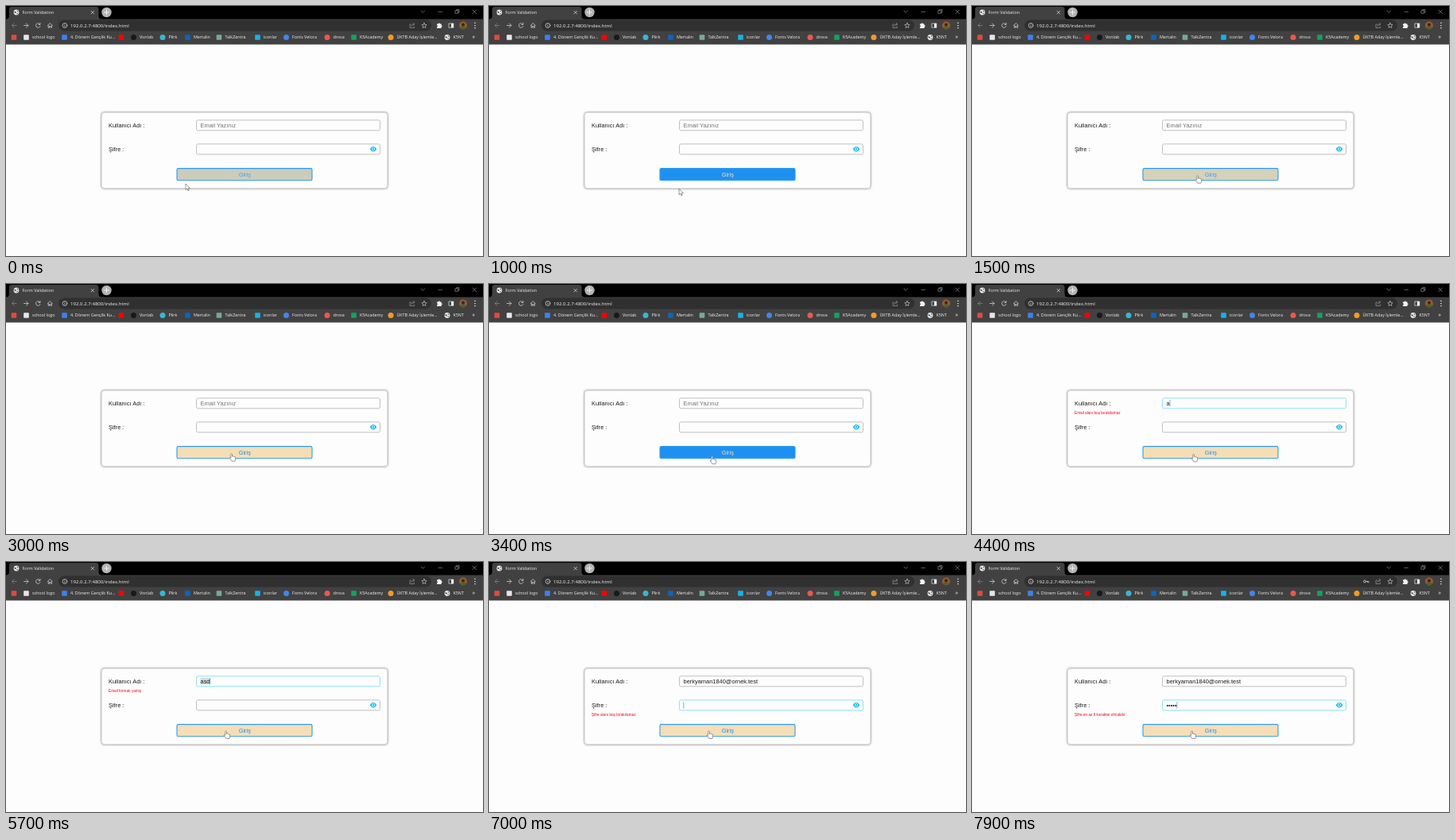
These frames come from a looping animation (600 by 315 pixels, 8000 ms). An HTML page:

```html
<!DOCTYPE html>
<html lang="tr">
<head>
<meta charset="utf-8">
<title>Form Validation</title>
<style>
  html, body { margin: 0; width: 100%; height: 100%; overflow: hidden; background: #fdfdfd; }
  svg { display: block; width: 600px; height: 315px; }
  text { white-space: pre; }
  .ui { font: 5.4px "Open Sans", "Noto Sans", sans-serif; fill: #f1f1f1; }
  .url { font-size: 6.1px; }
  .form { font: 7.45px "Liberation Sans", Arial, sans-serif; fill: #1c1c1c; }
  .error { font-size: 4.7px; fill: #f00018; }
  .line { fill: none; stroke: #d4d4d4; stroke-width: .75; stroke-linecap: round; stroke-linejoin: round; }
  .window { stroke: #a8a8a8; stroke-width: .6; }
  .field { fill: #fdfdfd; stroke-width: .8; }
  .cursor { fill: #fff; stroke: #555; stroke-width: .6; stroke-linejoin: round; }
  #hint { fill: #757575; }
</style>
</head>
<body>
<svg viewBox="0 0 600 315">
  <defs>
    <filter id="blur" x="-5%" y="-15%" width="110%" height="130%"><feGaussianBlur stdDeviation="1.5"/></filter>
    <g id="globe">
      <circle r="3.4" fill="#e8eaed"/>
      <path d="M-2.8-1.4 0-.6-.6 1-2 .8ZM.6-2.8 2.6-1.6 1.4-.4ZM.4 1.2 2.4.6 1 2.8Z" fill="#4a4c50"/>
    </g>
  </defs>

  <rect width="600" height="315" fill="#fdfdfd"/>
  <rect width="600" height="17" fill="#000"/>
  <path d="M0 16.500Q4 16.500 4 12V4Q4 1 7 1H113Q116.500 1 116.500 4V12Q116.500 16.500 120 16.500H600V48.500H0Z" fill="#414141"/>
  <rect x="66" y="17.500" width="469" height="14" rx="7" fill="#303030"/>

  <g class="ui">
    <use href="#globe" x="13" y="8"/>
    <text x="20.500" y="10">Form Validation</text>
    <text class="url" x="81" y="26.500">192.0.2.7:4800/index.html</text>
    <g id="bookmarks"></g>
    <text x="586.500" y="41" font-size="7">»</text>
  </g>

  <circle cx="126.500" cy="8" r="6.200" fill="#b4b4b4"/>
  <g class="line">
    <path d="M107 6.300l3.600 3.600m0-3.600-3.600 3.600"/>
    <path d="M123.500 8h6m-3-3v6" stroke="#fff"/>
    <g class="window">
      <path d="M522 6l2.300 2.200L526.600 6M544 7.300h4.500M587 5l4.500 4.500m0-4.500L587 9.500"/>
      <path d="M565.300 5.800h3.400v3.400h-3.400zM566.600 5.600V4.600h3.400V8h-1"/>
    </g>
    <path d="M13 24.500H7.500m2.600-2.600-2.600 2.600 2.600 2.600" stroke="#85878b"/>
    <path d="M22.500 24.500H28m-2.600-2.600 2.600 2.600-2.600 2.600"/>
    <path d="M42.600 22.800A2.800 2.800 0 1 0 43 25.500M43 21.500v2h-2"/>
    <path d="M52.300 24.500 55.300 21.700 58.300 24.500M53.200 24.500v2.800h1.300v-1.800h1.600v1.800h1.300v-2.800"/>
    <circle cx="74" cy="24.500" r="2.900"/>
    <path d="M74 24.300v1.600m0-3.100v.1"/>
    <path d="M509.500 23h-1.500v4.500h5.500V26M509.800 25.500q.3-2.500 3.700-2.700m-1.300-1.500 1.600 1.500-1.600 1.500" stroke="#aaa" stroke-width=".6"/>
    <path d="M526 21.300l.9 2.200 2.300.2-1.800 1.500.6 2.300-2-1.200-2 1.200.6-2.300-1.800-1.500 2.300-.2Z" stroke-width=".6"/>
    <path d="M557.300 22h5.500v5.200h-5.500z"/>
  </g>
  <path d="M542 22.500h1.700a1.100 1.100 0 0 1 2.200 0h1.700v1.700a1.100 1.100 0 0 1 0 2.200v1.500H542v-1.700a1 1 0 0 0 0-2Z" fill="#f1f3f4"/>
  <path d="M560 22h3v5.200h-3zM589.300 20.800h1.300v1.300h-1.300zM589.300 23.900h1.300v1.300h-1.300zM589.300 27h1.300v1.300h-1.300z" fill="#f1f3f4"/>
  <g id="key" class="line">
    <circle cx="494" cy="24.500" r="1.500"/>
    <path d="M495.500 24.500h3.500v1.400m-1.500-1.400v1"/>
  </g>
  <circle cx="575" cy="24.500" r="5" fill="#9a5a2b"/>
  <path d="M571 27.300q4-4 8 0-1.500 2.200-4 2.200t-4-2.200Z" fill="#49642f"/>
  <circle cx="575" cy="23.400" r="2" fill="#3b2418"/>

  <rect x="120" y="134" width="360" height="96" rx="4" fill="#777" filter="url(#blur)"/>
  <rect x="120.200" y="134.200" width="359.600" height="95.600" rx="4" fill="#fdfdfd" stroke="#c8c8c8" stroke-width=".5"/>

  <g class="form">
    <text x="129" y="153">Kullanıcı Adı :</text>
    <text x="129" y="183">Şifre :</text>
    <text id="emailError" class="error" x="129" y="163.500"></text>
    <text id="passError" class="error" x="129" y="193.500"></text>
    <rect id="emailBox" class="field" x="239.500" y="143.800" width="231" height="13" rx="2"/>
    <rect id="passBox" class="field" x="239.500" y="173.900" width="231" height="13" rx="2"/>
    <rect id="selection" x="244.500" y="146" width="12.500" height="8.600" fill="#d5dde3"/>
    <text id="hint" x="244.500" y="153">Email Yazınız</text>
    <text id="email" x="244.500" y="153"></text>
    <text id="pass" x="244.500" y="183"></text>
    <rect id="caret" width=".7" height="8.400" fill="#1f9fc4"/>
    <path d="M457.700 180.200Q459.500 177 462 177t4.300 3.200q-1.800 3.200-4.300 3.200t-4.300-3.200Z" fill="#10bdf0"/>
    <circle cx="462" cy="180.200" r="2" fill="#fff"/>
    <circle cx="462" cy="180.200" r="1.200" fill="#10bdf0"/>
    <rect id="button" x="215" y="204.600" width="170" height="15.200" rx="1.800" stroke="#2c9bf2" stroke-width="1.100"/>
    <text id="buttonText" x="300.300" y="215" text-anchor="middle">Giriş</text>
  </g>

  <path id="arrow" class="cursor" d="M0 0V7.600L1.800 6 3 8.800 4.200 8.300 3 5.600H5.300Z"/>
  <path id="hand" class="cursor" d="M-.2.800Q.8-.6 1.500.8V3.700Q2.500 3 3 4q1-.5 1.400.3 1.200-.3 1.300.8V7.200Q5.500 8.200 4.900 9.700H.8Q.1 8-1.900 5.900-1.800 4.500-.2 5.600Z"/>
</svg>

<script>
const LOOP = 8000, STEP = 100;
const ADDRESS = 'berkyaman1840@ornek.test';
const ui = Object.fromEntries([...document.querySelectorAll('[id]')].map(el => [el.id, el]));

// Icon x, icon shape, icon colour, label
const bookmarks = [
  [10, 'square', '#e04a3f', ''],
  [25.5, 'square', '#e6e6ea', 'school logo'],
  [73.5, 'square', '#3b82f0', '4. Dönem Gençlik Ku...'],
  [145, 'square', '#f00', ''],
  [160.5, 'circle', '#17191c', 'Vonlab'],
  [197, 'circle', '#37b6d8', 'Plirk'],
  [228.5, 'square', '#0a66c2', 'Mertalin'],
  [268, 'square', '#74aa9c', 'TalkZentra'],
  [316.5, 'square', '#12b5e8', 'iconlar'],
  [352.5, 'circle', '#3f86f0', 'Fonts Velora'],
  [404, 'circle', '#f0564a', 'drova'],
  [437.5, 'square', '#14a35c', 'K5Academy'],
  [484, 'circle', '#f39a26', 'ÜKTB Aday İşlemle...'],
  [555, 'globe', '', 'K5NT'],
];
const icons = {
  square: (x, fill) => `<rect x="${x - 3.3}" y="36.200" width="6.600" height="6.600" rx=".8" fill="${fill}"/>`,
  circle: (x, fill) => `<circle cx="${x}" cy="39.500" r="3.500" fill="${fill}"/>`,
  globe: x => `<use href="#globe" x="${x}" y="39.500"/>`,
};
ui.bookmarks.innerHTML = bookmarks.map(([x, shape, fill, label]) =>
  icons[shape](x, fill) + `<text x="${x + 7.4}" y="41.400">${label}</text>`).join('');

// Timelines of [start, value]
const cursorPath = [
  [0, [226, 224]], [200, [232, 228]], [900, [232, 228]], [1100, [246, 232.5]],
  [1200, [246, 232.5]], [1500, [283, 213.5]], [3000, [283, 213.5]], [3400, [280, 217]],
  [3700, [280, 215.5]], [4200, [280, 215.5]], [4600, [276, 212.8]],
];
const hover = [
  [0, [.8]], [200, [0]], [1300, [0]], [1500, [.85]], [1800, [.85]], [2000, [1]],
  [3000, [1]], [3400, [0]], [3500, [0]], [3700, [.3]], [3900, [.85]], [4100, [1]],
];
const buttonFill = [
  [0, [30, 144, 240]], [.3, [92, 160, 203]], [.8, [203, 204, 188]], [1, [245, 222, 181]],
];
const buttonInk = [[0, [245, 222, 179]], [1, [30, 144, 255]]];
const emailTyped = [
  [0, ''], [4400, 'a'], [4500, 'as'], [4600, 'asd'],
  ...[[6000, 1], [6100, 2], [6200, 3], [6400, 4], [6500, 24]].map(([at, n]) => [at, ADDRESS.slice(0, n)]),
];
const passTyped = [[0, ''], ...[1, 2, 3, 4, 5].map(n => [7300 + n * 100, '•'.repeat(n)])];
const emailErrors = [[0, ''], [3600, 'Email alanı boş bırakılamaz'], [4900, 'Email formatı yanlış'], [6700, '']];
const passErrors = [[0, ''], [6700, 'Şifre alanı boş bırakılamaz'], [7900, 'Şifre en az 6 karakter olmalıdır']];
const focus = [[0, ''], [3600, 'email'], [6700, 'pass']];
const caretStarts = [3800, 6700, ...emailTyped.slice(1).map(k => k[0]), ...passTyped.slice(1).map(k => k[0])];

const hold = (keys, t) => keys.findLast(([at]) => at <= t)[1];

function blend(keys, t) {
  const next = keys.findIndex(([at]) => at > t);
  if (next < 0) return keys.at(-1)[1];
  const [[t0, a], [t1, b]] = [keys[next - 1], keys[next]];
  return a.map((v, i) => v + (b[i] - v) * (t - t0) / (t1 - t0));
}

const rgb = color => `rgb(${color.map(Math.round)})`;
const show = (el, on) => el.setAttribute('visibility', on ? 'visible' : 'hidden');

function setText(el, value) {
  if (el.textContent !== value) el.textContent = value;
}

function drawCaret(t, active) {
  const start = Math.max(...caretStarts.filter(at => at <= t));
  const on = active && t >= 3800 && (t - start) % 1000 < 500;
  show(ui.caret, on);
  if (!on) return;
  const field = ui[active];
  const width = field.textContent ? field.getComputedTextLength() : 0;
  ui.caret.setAttribute('x', 244.5 + width);
  ui.caret.setAttribute('y', active === 'email' ? 146 : 176.2);
}

function draw(time) {
  const t = Math.floor((time % LOOP) / STEP) * STEP;
  const active = hold(focus, t);

  setText(ui.email, hold(emailTyped, t));
  setText(ui.pass, hold(passTyped, t));
  setText(ui.emailError, hold(emailErrors, t));
  setText(ui.passError, hold(passErrors, t));
  show(ui.hint, !ui.email.textContent);
  show(ui.selection, t >= 5700 && t < 6000);
  show(ui.key, t >= 7400);
  for (const name of ['email', 'pass']) {
    ui[name + 'Box'].setAttribute('stroke', active === name ? '#6fdcef' : '#b2b2b2');
  }
  drawCaret(t, active);

  const [level] = blend(hover, t);
  ui.button.setAttribute('fill', rgb(blend(buttonFill, level)));
  ui.buttonText.style.fill = rgb(blend(buttonInk, level));

  const pointing = t >= 1500;
  const cursor = pointing ? ui.hand : ui.arrow;
  cursor.setAttribute('transform', `translate(${blend(cursorPath, t)})`);
  show(ui.hand, pointing);
  show(ui.arrow, !pointing);
}

const origin = performance.now();
function tick() {
  draw(performance.now() - origin);
  requestAnimationFrame(tick);
}
tick();
</script>
</body>
</html>
```
